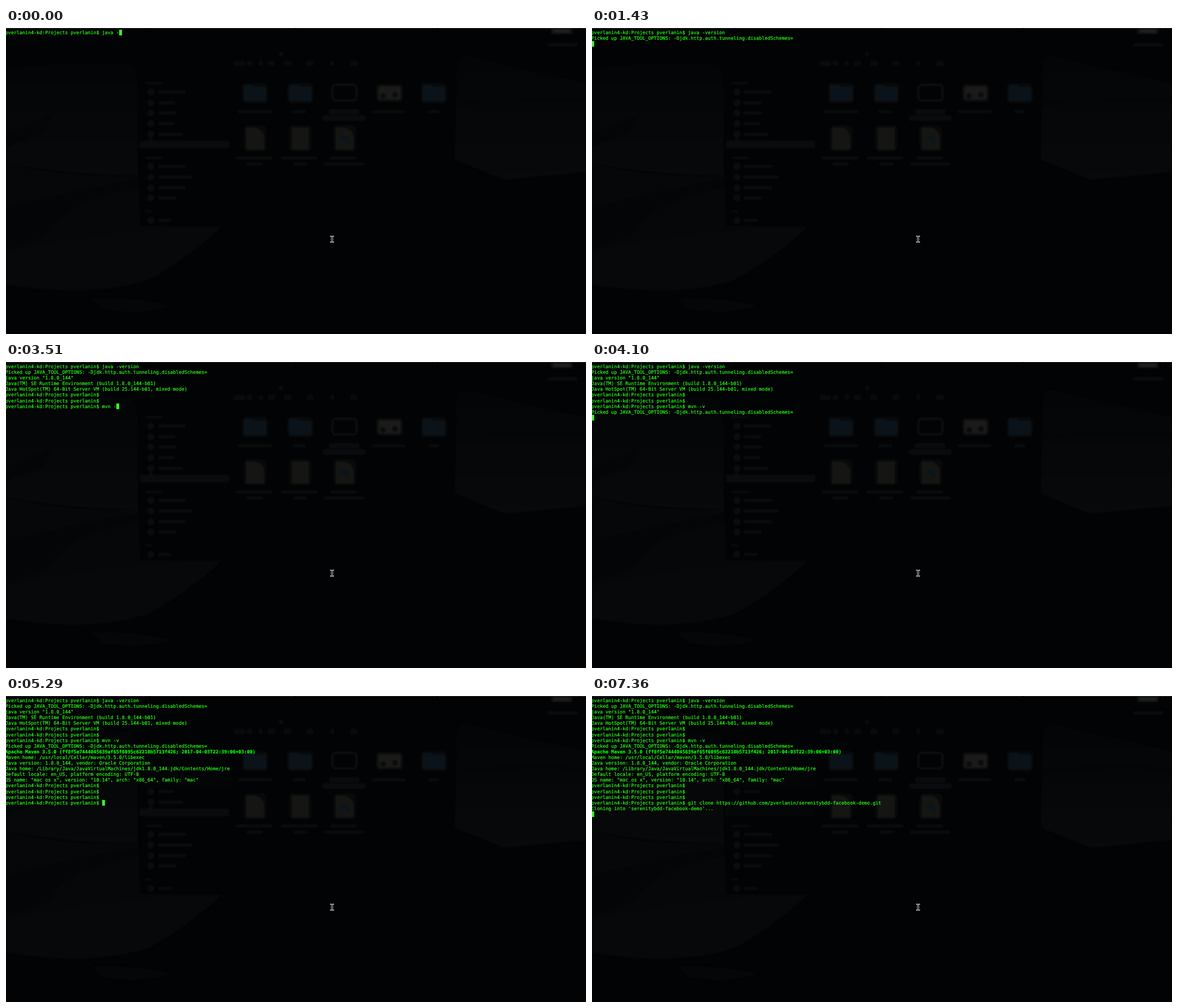
Animation of 1029 by 544 pixels, one loop 8000 ms. Source, as an HTML page:

```html
<!DOCTYPE html>
<html lang="en">
<head>
<meta charset="utf-8">
<title>Terminal session</title>
<style>
  html, body { margin: 0; height: 100%; overflow: hidden; background: #020304; }
  svg { display: block; }
  text {
    font: 8.39px "DejaVu Sans Mono", "Liberation Mono", monospace;
    fill: #28fe14;
    stroke: #28fe14;
    stroke-width: .22px;
    white-space: pre;
    text-rendering: geometricPrecision;
  }
  text.bold { font-weight: bold; fill: #00ff00; stroke: #00ff00; }
</style>
</head>
<body>
<svg width="1029" height="544" viewBox="0 0 1029 544">
  <defs>
    <filter id="soft" x="-20%" y="-20%" width="140%" height="140%" color-interpolation-filters="sRGB">
      <feGaussianBlur stdDeviation="1.1"/>
    </filter>
    <linearGradient id="hill" x2="0" y2="1">
      <stop offset="0" stop-color="#040506"/>
      <stop offset="1" stop-color="#08090a"/>
    </linearGradient>
  </defs>
  <rect width="1029" height="544" fill="#020304"/>
  <g filter="url(#soft)">
    <path fill="url(#hill)" d="M0 72 Q120 58 222 64 Q234 72 234 110 V262 Q110 262 0 240Z"/>
    <path fill="#060708" d="M0 240 Q100 266 236 262 L238 352 L383 353 Q330 405 255 447 Q150 482 0 456Z"/>
    <path fill="#07080a" d="M0 398 Q150 362 383 353 Q330 405 255 447 Q150 482 0 456Z"/>
    <path fill="#040506" d="M0 318 Q110 290 236 268 V284 Q120 305 85 350 Q80 372 0 392Z M0 188 L84 152 L66 186 L0 212Z"/>
    <path fill="#050607" d="M150 480 Q230 478 296 494 Q240 512 170 500Z"/>
    <path fill="url(#hill)" d="M800 62 Q802 48 818 50 L1029 98 V256 L885 270 L796 234Z"/>
    <path fill="#040506" d="M806 128 Q920 118 1029 126 V134 Q920 128 806 138Z"/>
  </g>
  <g id="desk" filter="url(#soft)"></g>
  <rect id="veilTop" x="240" y="93" width="160" height="71" fill="#030405"/>
  <rect id="veilLow" x="240" y="183" width="157" height="32" fill="#030405" opacity=".6"/>
  <path d="M0 .5H254M256 .5H513M515 .5H764M766 .5H1016M1018 .5H1029" stroke="#292a2b"/>
  <rect id="cursor" width="5.05" height="10.1" fill="#38fe27"/>
  <g id="screen"></g>
  <g fill="none" stroke-linecap="round" stroke-linejoin="round">
    <path id="beam" d="M576 370.5Q578.5 370.5 578.5 373V378Q578.5 380.5 576 380.5M581 370.5Q578.5 370.5 578.5 373M578.5 378Q578.5 380.5 581 380.5M577.5 375.5H579.5"/>
    <use href="#beam" stroke="#e8e8e8" stroke-width="2.3"/>
    <use href="#beam" stroke="#000" stroke-width=".9"/>
  </g>
</svg>
<script>
const LOOP = 8000, CELL = 5.05, LINE = 10.1, LEFT = -1.2, TOP = 3, BASE = 7.9, ROWS = 21;
const $ = id => document.getElementById(id);

function add(parent, tag, attrs) {
  const el = document.createElementNS('http://www.w3.org/2000/svg', tag);
  for (const key in attrs) el.setAttribute(key, attrs[key]);
  return parent.appendChild(el);
}

// Dim desktop behind the translucent terminal
const desk = $('desk');
const box = (x, y, width, height, fill, rx = 3) => add(desk, 'rect', { x, y, width, height, fill, rx });
const bar = (cx, cy, w, h = 6, fill = '#0a0b0c') => box(cx - w / 2, cy - h / 2, w, h, fill);
const dot = (cx, cy, r, fill = '#0b0c0d') => add(desk, 'circle', { cx, cy, r, fill });

box(237, 200, 159, 14, '#0a0b0c', 2);
[[262, 98, 32], [263, 231, 32], [253, 326, 14]].forEach(([x, y, w]) => bar(x, y, w, 5, '#090a0b'));
[[114, 50], [133, 32], [151, 33], [170, 30], [189, 45], [246, 51], [265, 63], [284, 51], [302, 33], [342, 25]]
  .forEach(([y, w]) => { dot(257, y, 6.5); bar(269 + w / 2, y, w); });
dot(257, 200, 4);

dot(488, 46, 4);
[[414, 20], [432, 10], [452, 8], [471, 13], [500, 14], [539, 13], [579, 7], [617, 14]]
  .forEach(([x, w]) => bar(x, 63, w, 10, '#090a0b'));

for (const x of [442, 522, 759]) {
  box(x - 23, 98, 46, 36, '#07090b', 6);
  box(x - 20, 101, 18, 8, '#0a1319');
  box(x - 20, 104, 40, 26, '#0a1319');
}
add(desk, 'rect', { x: 579, y: 101, width: 43, height: 28, rx: 6, fill: '#020304', stroke: '#0d0e0f', 'stroke-width': 4 });
box(657, 100, 47, 31, '#0d0d0d', 6);
box(661, 104, 39, 23, '#1a1a19');
dot(669, 121, 5);
dot(690, 119, 5);

for (const x of [442, 522, 601]) {
  box(x - 20, 173, 40, 46, '#090909', 6);
  const d = x === 522
    ? `M${x - 15} 177h30v39h-30z`
    : `M${x - 16} 177h17q15 5 15 19v20h-32z`;
  add(desk, 'path', { d, fill: '#151514' });
}
bar(600, 196, 14, 8, '#0a141a');
bar(606, 202, 8, 5, '#0a141a');

[[442, 149, 62], [520, 149, 25], [679, 149, 60], [759, 149, 20], [440, 231, 66], [441, 242, 30],
  [520, 231, 66], [522, 242, 26], [599, 231, 48], [600, 242, 72]].forEach(([x, y, w]) => bar(x, y, w));
bar(600, 149, 54, 10);
bar(600, 160, 76, 10);
box(967, 0, 38, 11, '#111213');
box(972, 3, 28, 5, '#1e1f20', 1);
bar(987, 30, 54, 7);

// Terminal output: each entry is appended at its time
const PS = 'pverlanin4-kd:Projects pverlanin$ ';
const PICKED = 'Picked up JAVA_TOOL_OPTIONS: -Djdk.http.auth.tunneling.disabledSchemes=\n';
const log = [
  [0, PS + 'java -'], [300, 've'], [540, 'rs'], [840, 'io'], [990, 'n'],
  [1280, '\n'], [1430, PICKED],
  [1580, `java version "1.8.0_144"
Java(TM) SE Runtime Environment (build 1.8.0_144-b01)
Java HotSpot(TM) 64-Bit Server VM (build 25.144-b01, mixed mode)
${PS}`],
  [2170, '\n' + PS], [2320, '\n' + PS],
  [2920, 'm'], [3070, 'vn'], [3210, ' '], [3510, '-'], [3660, 'v'],
  [3950, '\n'], [4100, PICKED],
  [4400, `Apache Maven 3.5.0 (ff8f5e7444045639af65f6095c62210b5713f426; 2017-04-03T22:39:06+03:00)
Maven home: /usr/local/Cellar/maven/3.5.0/libexec
Java version: 1.8.0_144, vendor: Oracle Corporation
Java home: /Library/Java/JavaVirtualMachines/jdk1.8.0_144.jdk/Contents/Home/jre
Default locale: en_US, platform encoding: UTF-8
OS name: "mac os x", version: "10.14", arch: "x86_64", family: "mac"
${PS}`],
  [5000, '\n' + PS], [5150, '\n' + PS], [5290, '\n' + PS],
  [5890, 'g'], [6040, 'it'], [6180, ' c'], [6330, 'lo'], [6480, 'n'], [6620, 'e '],
  [6920, 'https://github.com/pverlanin/serenitybdd-facebook-demo.git'],
  [7210, '\n'], [7360, "Cloning into 'serenitybdd-facebook-demo'...\n"],
];

const rows = Array.from({ length: ROWS }, (_, i) =>
  add($('screen'), 'text', { x: LEFT, y: TOP + BASE + i * LINE }));
const show = (id, on) => $(id).setAttribute('visibility', on ? 'visible' : 'hidden');

let shown = null;
function draw(t) {
  const text = log.filter(([at]) => at <= t).map(entry => entry[1]).join('');
  if (text === shown) return;
  shown = text;
  const lines = text.split('\n');
  rows.forEach((row, i) => {
    const line = lines[i] || '';
    row.textContent = line;
    row.classList.toggle('bold', line.startsWith('Apache'));
  });
  const last = lines.length - 1;
  $('cursor').setAttribute('x', LEFT + lines[last].length * CELL);
  $('cursor').setAttribute('y', TOP + last * LINE);
  show('veilTop', t >= 4400);
  show('veilLow', t >= 6920);
}

const start = performance.now();
function tick() {
  draw((performance.now() - start) % LOOP);
  requestAnimationFrame(tick);
}
tick();
</script>
</body>
</html>
```
